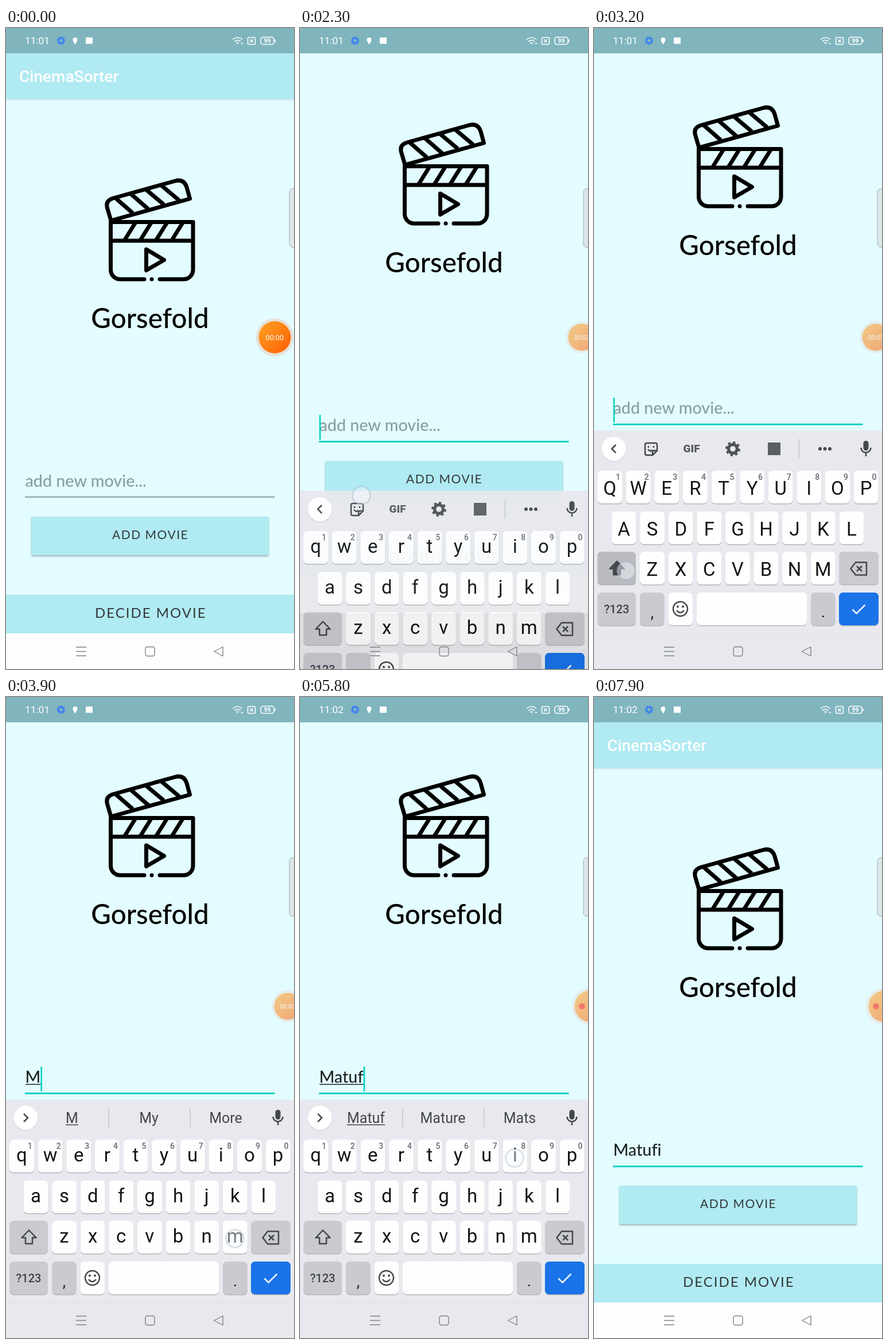
An HTML page that plays this animation: 502x1115 px, repeating every 8 s.

```html
<!DOCTYPE html>
<html lang="en">
<head>
<meta charset="utf-8">
<title>Film picker</title>
<style>
  html, body { margin: 0; width: 100%; height: 100%; overflow: hidden; background: #000; }
  svg { display: block; width: 100vw; height: 100vh; }
  text { font-family: Roboto, sans-serif; white-space: pre; font-variant-ligatures: none; }
  .mid { text-anchor: middle; }
  .app text { font-family: Lato, sans-serif; font-weight: 500; }
  .app .title { font: 500 28px Roboto, sans-serif; fill: #fff; }
  .film { font-size: 47.5px; }
  .field { font-size: 28.7px; }
  .app .label { font-weight: 400; fill: #35393b; }
  .raised { filter: drop-shadow(0 2px 1.5px rgba(0, 0, 0, .3)); }
  .line { fill: none; stroke: #000; stroke-width: 7; stroke-linecap: round; stroke-linejoin: round; }
  .key { font-size: 33px; fill: #131416; }
  .digit { font-size: 14px; font-weight: 500; fill: #66696e; }
  .word { font-size: 25px; fill: #44474c; }
  .ink { fill: none; stroke: #44474c; stroke-width: 2.5; stroke-linejoin: round; }
  .nav { fill: none; stroke: #7f8286; stroke-width: 1.4; stroke-linejoin: round; }
</style>
</head>
<body>
<svg viewBox="0 0 502 1115" preserveAspectRatio="none">
  <defs>
    <linearGradient id="orange" x1="0" y1="0" x2="1" y2="1">
      <stop offset=".1" stop-color="#fd9c20"/><stop offset=".9" stop-color="#ff6508"/>
    </linearGradient>
    <linearGradient id="shade" x1="0" y1="0" x2="0" y2="1">
      <stop offset="0" stop-color="#b9d3d7"/><stop offset="1" stop-color="#e3fcff"/>
    </linearGradient>
  </defs>

  <g id="page" class="app">
    <rect width="502" height="1115" fill="#e3fcff"/>
    <rect y="44" width="502" height="79" fill="#b0eaf2"/>
    <rect y="123" width="502" height="4" fill="url(#shade)" opacity=".7"/>
    <text class="title" x="23" y="94">CinemaSorter</text>

    <g class="line">
      <path d="M183 335L176.500 313Q173 300 187 296L295 266Q310 262 315 277L320.500 297Z"/>
      <path d="M190 295l31 27M217 288l31 27M244 281l31 26M271 274l31 26" stroke-linecap="butt"/>
      <path d="M241 437H199a16.500 16.500 0 0 1-16.500-16.500V337.500H326V420.500a16.500 16.500 0 0 1-16.500 16.500H268M182.500 370H326"/>
      <path d="M226 338l-20 32M253.500 338l-20 32M281 338l-20 32M308.500 338l-20 32" stroke-linecap="butt"/>
      <path d="M244.500 385L275.500 403.500L244.500 421.500ZM254 437h.01"/>
    </g>
    <text class="film mid" x="251" y="522">Gorsefold</text>

    <text id="hint" class="field" x="33.500" y="798" fill="#8b9da0">add new movie...</text>
    <text id="typed" class="field" x="33.500" y="798" fill="#1d2324"></text>
    <rect id="compose" x="34" y="800" height="1.500" fill="#1d2324"/>
    <rect id="rule" x="33" width="435.500"/>
    <rect id="cursor" y="770" width="2.800" height="43" fill="#12d3c3"/>

    <rect class="raised" x="44" y="850" width="414" height="67" rx="2" fill="#b0eaf2"/>
    <text class="label" x="185" y="889" font-size="21" letter-spacing="1.500">ADD MOVIE</text>
    <rect y="986" width="502" height="67" fill="#b0eaf2"/>
    <text class="label" x="155" y="1026" font-size="24" letter-spacing="2">DECIDE MOVIE</text>
    <rect y="1053" width="502" height="62" fill="#fefdfe"/>
  </g>

  <g id="board"></g>

  <g class="nav">
    <path d="M122 1077h18M122 1084.500h18M122 1092h18M378 1076.500v16L362.500 1084.500Z"/>
    <rect x="243" y="1076.500" width="16" height="16" rx="3.500"/>
  </g>

  <g id="status">
    <rect width="502" height="44" fill="#80b5be"/>
    <text id="clock" x="33" y="28" font-size="17.300" fill="#fff"></text>
    <path d="M120.500 29c-2-4-4-6-4-8.500a4 4 0 0 1 8 0c0 2.500-2 4.500-4 8.500Z" fill="#fff"/>
    <rect x="139" y="16.500" width="12" height="11" fill="#fff"/>
    <g fill="none" stroke="#fff" stroke-width="1.600">
      <path d="M395 20q8.500-7 17 0M398 23.500q5.500-4.500 11 0M401 26.500q2.500-2 5 0"/>
      <rect x="421.500" y="16.500" width="13" height="12" rx="2"/>
      <path d="M425.500 20l5 5m0-5l-5 5"/>
      <rect x="444" y="16" width="23" height="12.500" rx="4"/>
      <path d="M469 20v4.500"/>
    </g>
    <path d="M403 27.500h2l-1 1.500zM409.500 26h4l-2 3z" fill="#fff"/>
    <text class="mid" x="455.500" y="26" font-size="10.500" font-weight="700" fill="#fff">99</text>
  </g>

  <rect x="494" y="279.500" width="16" height="102" rx="6" fill="#dce6e8" stroke="#9fb0b3"/>

  <g id="bubble">
    <circle r="33" fill="#e7dfd5" opacity=".9"/>
    <circle r="28" fill="url(#orange)"/>
    <text id="timer" class="mid" y="4.700" font-size="12.600" fill="#fff"></text>
  </g>
  <circle id="dot" cx="491.500" cy="538" r="5.300" fill="#f4766c"/>

  <circle id="tap" r="15.500" fill="#f4fbff" fill-opacity=".45" stroke="#9fb3c2" stroke-opacity=".5" stroke-width="2"/>
</svg>

<script>
const LOOP = 8000, STEP = 100;
const $ = id => document.getElementById(id);
const show = (el, on) => el.setAttribute('visibility', on ? 'visible' : 'hidden');
const set = (el, attrs) => { for (const k in attrs) el.setAttribute(k, attrs[k]); };

// Drawing helpers
const gear = (x, y, r, color) => `<g fill="none" stroke="${color}">
  <circle cx="${x}" cy="${y}" r="${r * .58}" stroke-width="${r * .42}"/>
  <circle cx="${x}" cy="${y}" r="${r * .85}" stroke-width="${r * .3}" pathLength="16" stroke-dasharray="1 1"/></g>`;
const cap = (x, y, w, fill) =>
  `<rect x="${x}" y="${y + 1.5}" width="${w}" height="57" rx="7" fill="#b3b5bb"/>
   <rect x="${x}" y="${y}" width="${w}" height="57" rx="7" fill="${fill}"/>`;
const letterKey = (char, x, y) => cap(x - 21.5, y, 43, '#fefefe') +
  `<text class="key mid" data-char="${char}" data-row="${y}" x="${x}"></text>`;
const row = (chars, x, y) => [...chars].map((c, i) => letterKey(c, x + i * 49.62, y)).join('');
const divider = x => `<path d="M${x} 715v33" stroke="#c3c5ca" stroke-width="1.5"/>`;
const word = (x, id) => `<text id="${id}" class="word mid" x="${x}" y="741"></text>`;

function drawBoard() {
  const GRAY = '#cacbd1', WHITE = '#fefefe';
  const digits = [...'1234567890'].map((d, i) =>
    `<text class="digit mid" x="${42 + i * 49.62}" y="786">${d}</text>`).join('');
  $('board').innerHTML = `
    <rect y="700" width="502" height="420" fill="#e8e9ee"/>
    <path d="M0 1054h502" stroke="#dcdde2"/>
    <circle cx="34.5" cy="733" r="21.5" fill="#d5d6db"/>
    <circle cx="34.5" cy="732" r="21" fill="#fff"/>
    <path id="arrow" class="ink"/>
    <g id="tools">
      <path class="ink" d="M92 722h15q3 0 3 3v10l-8 8h-10q-3 0-3-3v-15q0-3 3-3ZM110 735h-5q-3 0-3 3v5M94 733q4 5 8 1M95 727v3M104 727v3"/>
      <text class="mid" x="170" y="738" font-size="19" font-weight="900" fill="#55585d">GIF</text>
      ${gear(242, 732, 13, '#4f5257')}
      <rect x="303" y="721" width="22" height="22" fill="#5b5e63"/>
      ${divider(357.5)}
      <path d="M394 732h.01M402.500 732h.01M411 732h.01" stroke="#44474c" stroke-width="6" stroke-linecap="round"/>
    </g>
    <g id="words">${word(115, 'word0') + word(249, 'word1') + word(383, 'word2')}
      <rect id="under" y="743.5" height="1.5" fill="#44474c"/>${divider(179)}${divider(321)}</g>
    <rect x="469.500" y="718" width="9" height="17" rx="4.500" fill="#44474c"/>
    <path class="ink" d="M465.500 730a8.500 8.500 0 0 0 17 0M474 739v6"/>
    ${row('qwertyuiop', 27.5, 770)}${digits}${row('asdfghjkl', 52, 841)}${row('zxcvbnm', 101.5, 911)}
    ${cap(6, 911, 67, GRAY)}<rect id="pressed" x="6" y="911" width="67" height="57" rx="7" fill="#b9bbc0"/>
    <path id="shift" class="ink" d="M40 927.500L52.500 940.500H46V951H34V940.500H27.500Z"/>
    ${cap(427, 911, 69, GRAY)}
    <path class="ink" d="M456 929.500H475V951.500H456L447.500 940.500ZM458 936l9 9m0-9l-9 9"/>
    ${cap(6, 982, 67, GRAY)}
    <text class="mid" x="39.500" y="1018" font-size="20" font-weight="500" fill="#3f4247">?123</text>
    ${cap(80, 982, 42.5, GRAY)}<text class="mid" x="101.500" y="1026" font-size="27" fill="#222">,</text>
    ${cap(129.5, 982, 42.5, WHITE)}
    <g class="ink"><circle cx="150.500" cy="1010.500" r="12.500"/><path d="M144 1013q6.500 8 13 0"/></g>
    <path d="M146 1006.500h.01M155 1006.500h.01" stroke="#44474c" stroke-width="4" stroke-linecap="round"/>
    ${cap(179, 982, 192, WHITE)}
    ${cap(378, 982, 42.5, GRAY)}<text class="mid" x="399.500" y="1025" font-size="27" fill="#222">.</text>
    ${cap(427, 982, 69, '#1a73e8')}
    <path d="M450.500 1011.500l7 7 15-15" fill="none" stroke="#fff" stroke-width="2.500"/>`;
}

// Tracks: [start time, values...]
const PAGE = [[0, 0], [2200, -38], [2300, -97], [2400, -124], [2500, -127],
  [6300, -88], [6400, -26], [6500, -5], [6600, 0]];
const BOARD = [[0, 420, 0], [2200, 270, .6], [2300, 105, .95], [2400, 26, 1], [2500, 0, 1],
  [6300, 48, .75], [6400, 137, .3], [6500, 190, .06], [6600, 420, 0]];
const BUBBLE = [[0, 468.5, 1, 1], [1400, 471, .98, .92], [1500, 478, .93, .8], [1600, 484, .87, .65],
  [1700, 487.5, .84, .55], [1800, 490, .84, .55], [1900, 491, .84, .55],
  [5400, 499, .92, .55], [5500, 506, .98, .55]];
const TIMER = [[0, '00:00'], [1100, '00:01'], [2100, '00:02'], [3200, '00:03'],
  [4100, '00:04'], [4700, '00:05'], [5400, '']];
const TYPED = [[0, ''], [3900, 'M'], [4200, 'Ma'], [4600, 'Mat'], [5000, 'Matu'], [5400, 'Matuf'], [5900, 'Matufi']];
const GUESS = { M: ['My', 'More'], Ma: ['May', 'Make'], Mat: ['May', 'Mature'],
  Matu: ['Mature', 'Matures'], Matuf: ['Mature', 'Mats'], Matufi: ['Mature', 'Mats'] };
const BLINK = [[2200], [3900], [4200], [4600], [5000], [5400], [5900], [6400]];
// Touches: start, end, x, y
const TAPS = [[1600, 1900, 59, 615], [2100, 2500, 107, 813], [3200, 3500, 56, 944], [3800, 4100, 399, 942],
  [4100, 4400, 52, 872], [4500, 4800, 226, 802], [4900, 5200, 325, 802], [5300, 5600, 201, 872],
  [5800, 6100, 374, 802], [6200, 6500, 447, 1030]];
const at = (track, t) => track.findLast(k => k[0] <= t);

drawBoard();
$('status').insertAdjacentHTML('beforeend', gear(96, 22, 7.5, '#3f82f2'));
const letters = [...document.querySelectorAll('[data-char]')];

function drawField(t, typed) {
  const focused = t >= 2200, composing = typed && t < 6200;
  $('typed').textContent = typed;
  show($('hint'), !typed);
  const width = typed ? $('typed').getComputedTextLength() : 0;
  set($('compose'), { width: composing ? width : 0 });
  set($('rule'), focused ? { y: 815, height: 3, fill: '#12d3c3' } : { y: 815, height: 1.5, fill: '#718184' });
  set($('cursor'), { x: 33.5 + width });
  show($('cursor'), focused && Math.floor((t - at(BLINK, t)[0]) / 500) % 2 === 0);
}

function drawKeys(t, typed) {
  const upper = t >= 3200 && t < 3900, composing = typed && t < 6200;
  for (const el of letters) {
    const char = el.dataset.char;
    el.textContent = upper ? char.toUpperCase() : char;
    set(el, { y: +el.dataset.row + (upper ? 42 : 38) });
  }
  set($('shift'), { style: upper ? 'fill:#44474c' : '' });
  show($('pressed'), t >= 3200 && t < 3500);
  show($('tools'), !typed);
  show($('words'), composing);
  set($('arrow'), { d: typed ? 'M31 725l7 7-7 7' : 'M38 725l-7 7 7 7' });
  if (!composing) return;
  [typed, ...GUESS[typed]].forEach((w, i) => { $('word' + i).textContent = w; });
  const w = $('word0').getComputedTextLength();
  set($('under'), { x: 115 - w / 2, width: w });
}

function drawTap(t) {
  const tap = TAPS.find(([from, to]) => t >= from && t < to);
  show($('tap'), tap);
  if (tap) set($('tap'), { cx: tap[2], cy: tap[3], opacity: t >= tap[1] - STEP ? .35 : 1 });
}

function render(t) {
  const typed = at(TYPED, t)[1];
  const [, boardY, boardAlpha] = at(BOARD, t);
  const [, x, scale, alpha] = at(BUBBLE, t);
  set($('page'), { transform: `translate(0 ${at(PAGE, t)[1]})` });
  set($('board'), { transform: `translate(0 ${boardY})`, opacity: boardAlpha });
  set($('bubble'), { transform: `translate(${x} 538) scale(${scale})`, opacity: alpha });
  $('timer').textContent = at(TIMER, t)[1];
  $('clock').textContent = t < 4100 ? '11:01' : '11:02';
  show($('dot'), t >= 5500);
  drawField(t, typed);
  drawKeys(t, typed);
  drawTap(t);
}

const start = performance.now();
function tick() {
  const t = (performance.now() - start) % LOOP;
  render(Math.floor(t / STEP) * STEP);
  requestAnimationFrame(tick);
}
tick();
</script>
</body>
</html>
```
